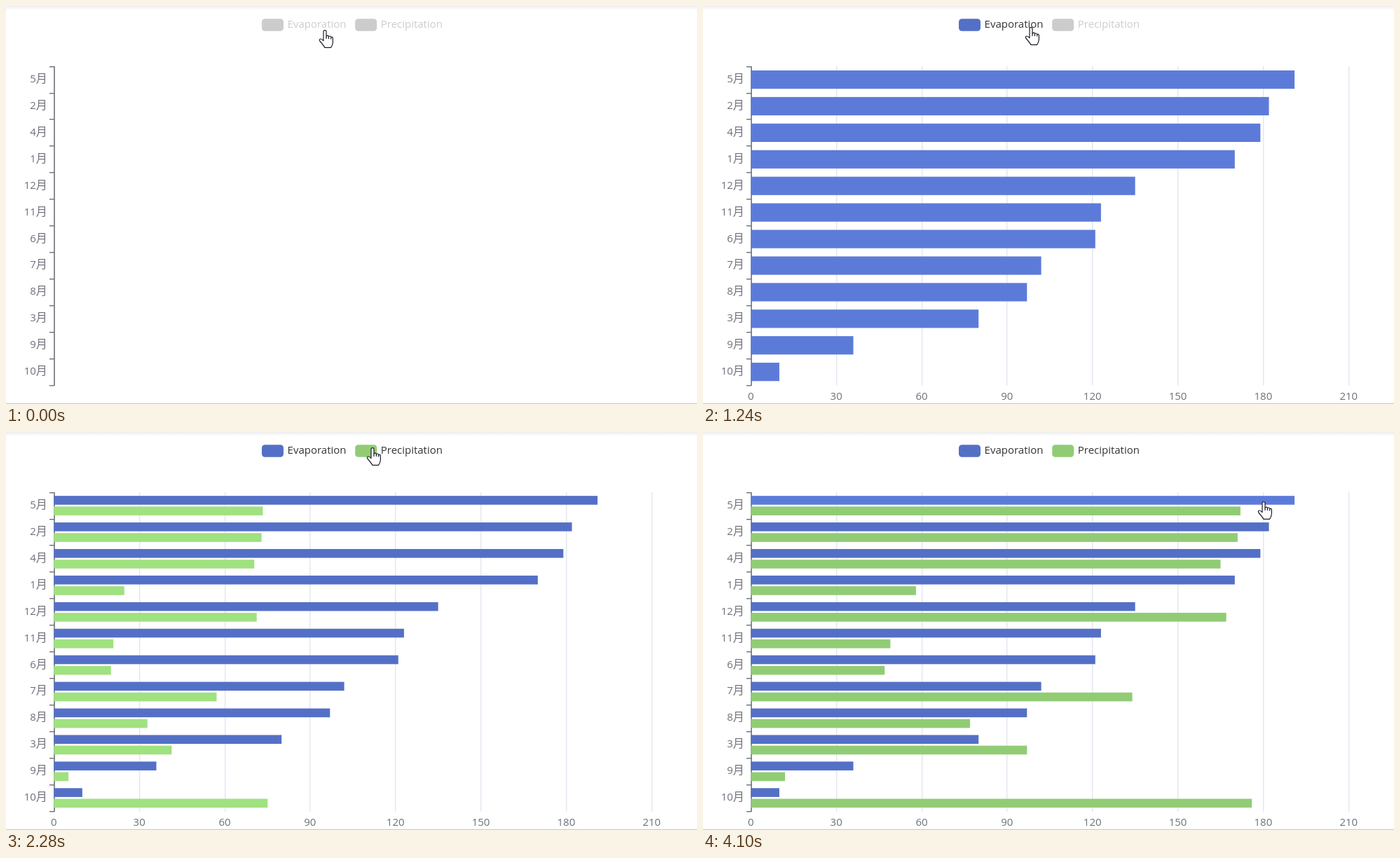
Animation, 986 px wide and 568 px high, one loop 4500 ms. Source, as an HTML page:

```html
<!DOCTYPE html>
<html lang="en">
<head>
<meta charset="utf-8">
<title>Bar chart</title>
<style>
html, body { margin: 0; width: 100%; height: 100%; overflow: hidden; background: #fff; }
svg { display: block; width: 986px; height: 568px; }
text { font: 15px "Open Sans", "Noto Sans CJK SC", "Noto Sans CJK", sans-serif; fill: #6e7079; }
tspan { font-size: 16px; }
</style>
</head>
<body>
<svg viewBox="0 0 986 568">
  <defs>
    <linearGradient id="shade" x2="0" y2="1">
      <stop offset="0" stop-color="#eee"/>
      <stop offset="1" stop-color="#fff"/>
    </linearGradient>
  </defs>
  <rect width="986" height="6" fill="url(#shade)"/>
  <rect y="567" width="986" height="1" fill="#c4c4c4"/>
  <g id="grid"></g>
  <g id="axis"></g>
  <g id="bars"></g>
  <g id="legend"></g>
  <g id="hand" fill="#fff" stroke="#1c1c28" stroke-width="1.2" stroke-linejoin="round">
    <path d="M-2 15V2.5Q-2 .6 0 .6T2 2.5V9Q4.8 7 5.4 9.6Q8 8 8.7 10.6Q11 9.5 11.4 12V18Q11 22 8.5 25.4H0Q-2 22-7.2 16Q-8.5 13.5-6.2 13Q-4.5 12.8-2 15.5Z"/>
    <path d="M2 9V13M5.4 9.6V13M8.7 10.6V13.5" fill="none"/>
  </g>
  <path id="arrow" d="M.6 .8V18.5L5 14.5L8 21.4L11 20.2L8 13.4H14.2Z" fill="#fff" stroke="#1c1c28" stroke-width="1.2"/>
</svg>
<script>
const LOOP = 4500, LEFT = 68.3, TOP = 86.1, ROW = 37.92, UNIT = 4.0617;
const BLUE_AT = 70, GREEN_AT = 1790;
const BLUE = [84, 112, 198], BLUE_HOT = [92, 123, 217];
const GREEN = [145, 204, 117], GREEN_HOT = [160, 225, 128];

// chart data: month, evaporation, precipitation
const data = [
  [5, 191, 172], [2, 182, 171], [4, 179, 165], [1, 170, 58],
  [12, 135, 167], [11, 123, 49], [6, 121, 47], [7, 102, 134],
  [8, 97, 77], [3, 80, 97], [9, 36, 12], [10, 10, 176]
];

// pointer moves: start, duration, dx, dy
const moves = [[1200, 40, 13, -4], [1440, 210, 55, -8], [2850, 550, 269, 64], [3400, 700, 8, 13]];

const $ = id => document.getElementById(id);
const mix = (a, b, p) => a + (b - a) * p;
const smooth = p => p * p * (3 - 2 * p);
const inOut = p => p < .5 ? 4 * p ** 3 : 1 - 4 * (1 - p) ** 3;
const part = (t, start, length) => Math.min(1, Math.max(0, (t - start) / length));
const fade = (t, start) => 1 - (1 - part(t, start, 200)) ** 3;
const blend = (a, b, p) => `rgb(${a.map((v, i) => Math.round(mix(v, b[i], p)))})`;

function set(node, attrs) {
  for (const key in attrs) node.setAttribute(key, attrs[key]);
  return node;
}

function add(parent, tag, attrs, text = "") {
  const node = document.createElementNS("http://www.w3.org/2000/svg", tag);
  node.innerHTML = text;
  return $(parent).appendChild(set(node, attrs));
}

for (let i = 0; i <= 7; i++) {
  const x = LEFT + i * 30 * UNIT;
  if (i) add("grid", "rect", { x: Math.floor(x), y: 86, width: 1.4, height: 455.5, fill: "#e0e6f1" });
  add("grid", "text", { x, y: 562, "text-anchor": "middle" }, i * 30);
}

add("axis", "rect", { x: 68.2, y: 86, width: 1.6, height: 456, fill: "#6e7079" });
for (let i = 0; i <= data.length; i++) {
  add("axis", "rect", { x: 62, y: Math.floor(TOP + i * ROW), width: 7, height: 1.4, fill: "#6e7079" });
}

const rows = data.map(([month, blue, green], i) => {
  add("axis", "text", { x: 58.8, y: 109 + i * ROW, "text-anchor": "end" }, `${month}<tspan>月</tspan>`);
  return {
    blue, green,
    mid: TOP + (i + .5) * ROW,
    blueBar: add("bars", "rect", { x: LEFT }),
    greenBar: add("bars", "rect", { x: LEFT, height: 12.6 })
  };
});

function makeItem(x, name, color, start) {
  const icon = add("legend", "rect", { x, y: 18.2, width: 31, height: 17.5, rx: 4.5 });
  const label = add("legend", "text", { x: x + 36.6, y: 31 }, name);
  return t => {
    icon.style.fill = t >= start ? `rgb(${color})` : "#ccc";
    label.style.fill = t >= start ? "#333" : "#ccc";
  };
}
const items = [
  makeItem(365, "Evaporation", BLUE, BLUE_AT),
  makeItem(498.2, "Precipitation", GREEN, GREEN_AT)
];

function drawBars(t) {
  const blueGrow = t < BLUE_AT ? 0 : inOut(part(t, 24, 981));
  const greenGrow = inOut(part(t, 1811, 991));
  const split = inOut(part(t, GREEN_AT, 490));
  const blueFill = blend(BLUE_HOT, BLUE, fade(t, 1500));
  const hoverFill = blend(BLUE, BLUE_HOT, fade(t, 3840));
  const greenFill = blend(GREEN_HOT, GREEN, fade(t, 2930));

  rows.forEach((row, i) => {
    set(row.blueBar, {
      y: row.mid - mix(13.1, 13.9, split),
      height: mix(26.2, 12.6, split),
      width: row.blue * UNIT * blueGrow,
      fill: i === 0 && t >= 3840 ? hoverFill : blueFill
    });
    set(row.greenBar, {
      y: row.mid + 1.3,
      width: row.green * UNIT * greenGrow,
      fill: greenFill
    });
  });
}

function drawPointer(t) {
  let x = 455, y = 34;
  for (const [start, length, dx, dy] of moves) {
    const p = smooth(part(t, start, length));
    x += dx * p;
    y += dy * p;
  }
  const idle = y > 37 && y < 95;
  const transform = `translate(${x} ${y})`;
  set($("hand"), { transform, visibility: idle ? "hidden" : "visible" });
  set($("arrow"), { transform, visibility: idle ? "visible" : "hidden" });
}

function frame() {
  const t = performance.now() % LOOP;
  $("grid").style.display = t < BLUE_AT ? "none" : "";
  items.forEach(paint => paint(t));
  drawBars(t);
  drawPointer(t);
  requestAnimationFrame(frame);
}
frame();
</script>
</body>
</html>
```
